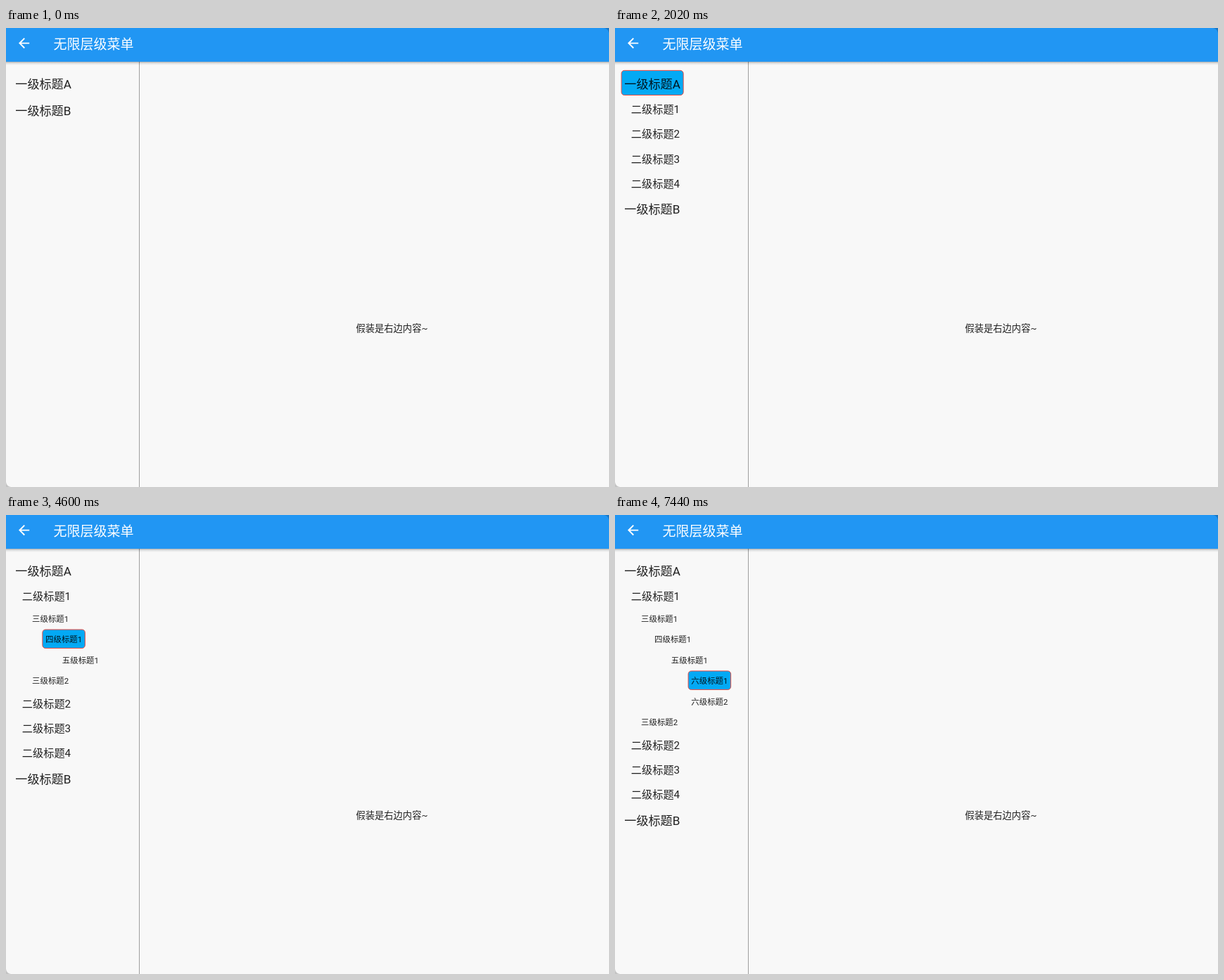
An HTML page that plays this animation: 857x653 px, repeating every 8000 ms.

```html
<!DOCTYPE html>
<html lang="zh-CN">
<head>
<meta charset="utf-8">
<title>无限层级菜单</title>
<style>
  html, body { margin: 0; width: 100%; height: 100%; overflow: hidden; background: #f8f8f8; }
  svg { display: block; width: 857px; height: 653px; }
  text { font-family: Roboto, "Noto Sans CJK SC", "Noto Sans CJK", sans-serif; fill: rgba(0, 0, 0, .87); }
</style>
</head>
<body>
<svg viewBox="0 0 857 653">
  <defs>
    <linearGradient id="shade" x2="0" y2="1">
      <stop stop-color="#000" stop-opacity=".3"/>
      <stop offset=".4" stop-color="#000" stop-opacity=".1"/>
      <stop offset="1" stop-color="#000" stop-opacity="0"/>
    </linearGradient>
  </defs>
  <rect width="857" height="653" fill="#f8f8f8"/>
  <rect x="189" y="48" width="1" height="605" fill="#9e9e9e"/>
  <rect y="48" width="857" height="5" fill="url(#shade)"/>
  <rect width="857" height="48" fill="#2196f3"/>
  <path d="M850 0h7v7q-1-6-7-7z" fill="#1976c4"/>
  <path d="M0 646v7h7q-6-1-7-7z" fill="#c4c4c4"/>
  <path transform="translate(14.2 10.2) scale(.95)" fill="#fff"
    d="M20 11H7.83l5.59-5.59L12 4l-8 8 8 8 1.41-1.41L7.83 13H20z"/>
  <text x="67.5" y="30" font-size="19" font-weight="500" style="fill:#fff">无限层级菜单</text>
  <text x="497.4" y="431.8" font-size="13.3">假装是右边内容~</text>
  <g id="menu"></g>
</svg>
<script>
const SCALE = 0.95;
const LOOP = 8000;
const CLICKS = [1300, 2500, 3600, 4600, 5500, 6600];
const LEVELS = "一二三四五六";
const FONT_SIZES = [18, 16, 12, 12, 12, 12];
const ROW_HEIGHTS = [40, 37, 31, 31, 31, 31];
const CHILDREN = ["AB", "1234", "12", "1", "1", "12"];
const menu = document.getElementById("menu");

// The first entry of each level is the one that unfolds.
function listRows(open, level = 0) {
  return [...CHILDREN[level]].flatMap((label, i) => [
    { level, label, active: i === 0 && level === open - 1 },
    ...(i === 0 && level < open && level < 5 ? listRows(open, level + 1) : [])
  ]);
}

function drawMenu(open) {
  let y = 59.9;
  menu.innerHTML = listRows(open).map(({ level, label, active }) => {
    const size = FONT_SIZES[level] * SCALE;
    const row = ROW_HEIGHTS[level] * SCALE;
    const x = 8.6 + (level * (level + 3) / 2) * 5 * SCALE;
    const width = size * (label === "A" ? 4.652 : label === "B" ? 4.623 : 4.562) + 9.5;
    const box = active
      ? `<rect x="${x + .5}" y="${y + .5}" width="${width - 1}" height="${row - 2.9}" rx="4.3"
           fill="#03a9f4" stroke="#f44336" stroke-width=".95"/>`
      : "";
    const text = `<text x="${x + 4.75}" y="${y + 5.1 + size * 1.2}" font-size="${size}">${LEVELS[level]}级标题${label}</text>`;
    y += row;
    return box + text;
  }).join("");
}

let shown = -1;
function tick(now) {
  const open = CLICKS.filter(t => t <= now % LOOP).length;
  if (open !== shown) drawMenu(shown = open);
  requestAnimationFrame(tick);
}
tick(performance.now());
</script>
</body>
</html>
```
